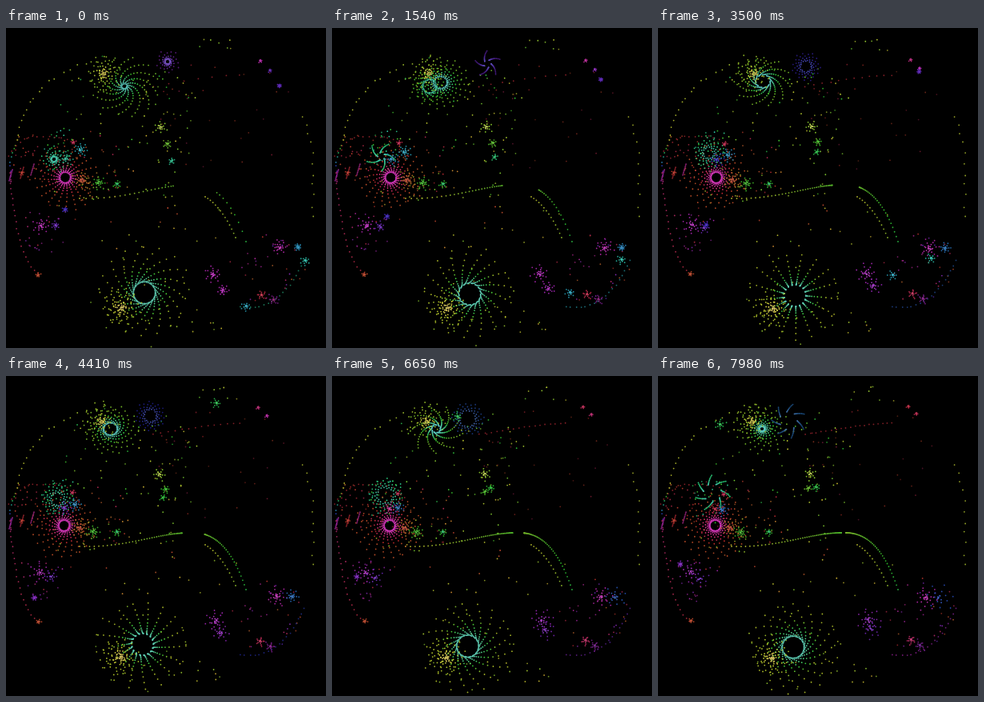
Animation, 400 px wide and 400 px high, one loop 8000 ms. Source, as an HTML page with a canvas:

```html
<!DOCTYPE html>
<html lang="en">
<head>
<meta charset="utf-8">
<title>Drifting orbits</title>
<style>
html, body { margin: 0; width: 100%; height: 100%; overflow: hidden; background: #000; }
canvas { display: block; width: 400px; height: 400px; }
</style>
</head>
<body>
<canvas id="stage" width="400" height="400"></canvas>
<script>
const ctx = document.getElementById('stage').getContext('2d');
const LOOP = 8000, STEP = 70, TAU = Math.PI * 2;
let progress = 0;

const mix = (a, b, u) => a + (b - a) * u;
const slide = (a, b, ease = 1) => mix(a, b, progress ** ease);
const settle = rate => Math.exp(-rate * progress);

function random(seed) {
  let s = Math.floor(seed * 7919) % 2147483647 + 1;
  const next = () => (s = (s * 16807) % 2147483647) / 2147483647;
  next();
  return next;
}

function dot(x, y, hue, light = 46, sat = 62) {
  ctx.fillStyle = `hsl(${hue} ${sat}% ${light}%)`;
  ctx.beginPath();
  ctx.arc(x, y, 0.9, 0, TAU);
  ctx.fill();
}

// Rotation orbit: arms appear whenever rho passes near a simple fraction
function bloom({ x, y, r, R, n, rho, pow = 2.5, hue, edge = hue, light = 58, dim = 42, sat = 50, flat = 1, phase = 0, noise = 0 }) {
  const rnd = random(n + R);
  for (let i = 0; i < n; i++) {
    const spread = (i / n) ** pow, d = r + (R - r) * spread;
    const a = phase + TAU * rho * i, c = Math.min(1, spread * 1.8);
    dot(x + d * Math.cos(a) + (rnd() - 0.5) * noise, y + d * Math.sin(a) * flat + (rnd() - 0.5) * noise,
      mix(hue, edge, c), mix(light, dim, c), mix(sat, 65, c));
  }
}

function star(x, y, R, n, hue, arms = 7, edge = hue, light = 52) {
  bloom({ x, y, r: 0.5, R, n, rho: 1 / arms + slide(-0.006, 0.006), pow: 1.4,
    hue, edge, light, dim: light * 0.75, noise: R * 0.17 });
}

// Star that crosses the stage during part of the loop
function traveller(from, to, x0, y0, x1, y1, hue, R = 7) {
  const u = (progress - from) / (to - from);
  if (u >= 0 && u <= 1) star(mix(x0, x1, u ** 1.2), mix(y0, y1, u), R, 17, hue, 6);
}

function curve([x0, y0, x1, y1, x2, y2, x3, y3], n, hue, edge, { light = 42, pow = 1, end = 1, noise = 0 } = {}) {
  const rnd = random(n + x0);
  const bezier = (a, b, c, d, u, v) => v * v * v * a + 3 * v * v * u * b + 3 * v * u * u * c + u * u * u * d;
  for (let i = 0; i < n; i++) {
    const u = end * (1 - (1 - i / (n - 1)) ** pow), v = 1 - u;
    dot(bezier(x0, x1, x2, x3, u, v) + (rnd() - 0.5) * noise,
      bezier(y0, y1, y2, y3, u, v) + (rnd() - 0.5) * noise, mix(hue, edge, u), light);
  }
}

function scatter(n, x, y, w, h, hue, spread, light = 43) {
  const rnd = random(x + y * n);
  for (let i = 0; i < n; i++) {
    const a = rnd() * TAU, d = Math.sqrt(rnd());
    const dx = (rnd() - 0.5) * 14, dy = (rnd() - 0.5) * 10;
    dot(x + w * d * Math.cos(a) + slide(-dx, dx), y + h * d * Math.sin(a) + slide(-dy, dy),
      hue + (rnd() - 0.5) * spread, light * mix(0.7, 1.15, rnd()));
  }
}

function drawBackground() {
  scatter(44, 150, 95, 82, 62, 95, 80);
  scatter(26, 205, 130, 40, 85, 80, 60);
  scatter(24, 65, 152, 26, 28, 140, 60);
  scatter(36, 48, 165, 45, 34, 358, 30, 38);
  scatter(28, 105, 175, 50, 48, 5, 50, 38);
  scatter(24, 110, 200, 72, 28, 60, 70);
  scatter(30, 270, 110, 85, 75, 355, 40, 24);
  scatter(22, 45, 248, 40, 32, 320, 90, 36);
  scatter(32, 325, 300, 48, 45, 320, 130, 36);
  scatter(18, 190, 250, 110, 45, 50, 80);
  scatter(26, 175, 345, 70, 50, 72, 30);
  scatter(7, 262, 22, 30, 14, 75, 50);
  scatter(6, 250, 380, 35, 16, 65, 40);
}

function drawTrails() {
  const pow = slide(1.2, 2.1);
  curve([92, 213, 150, 215, 190, 196, 229, 196], Math.round(slide(22, 60)), 60, 105, { pow, end: slide(0.83, 1) });
  curve([300, 267, 284, 218, 262, 196, 235, 196], Math.round(slide(9, 54)), 130, 85, { pow, end: slide(0.62, 1) });
  curve([249, 211, 263, 219, 277, 238, 287, 262], 14, 62, 78);

  curve([16, 140, 20, 92, 50, 52, 125, 38], 18, 60, 75, { noise: 5 });
  curve([40, 307, 18, 290, 9, 240, 5, 180], 22, 352, 330, { light: 38, pow: 1.5, noise: 1.5 });
  curve([16, 135, 8, 155, 3, 168, 6, 192], 11, 25, 320, { light: 38, noise: 2 });
  curve([5, 160, 14, 136, 45, 126, 86, 143], 15, 355, 355, { light: 32, noise: 4 });
  curve([372, 112, 382, 145, 388, 190, 384, 237], 11, 65, 70, { light: 40, noise: 5 });
  curve([184, 73, 225, 66, 258, 60, 292, 59], Math.round(slide(7, 19)), 355, 355, { light: 31, noise: 1 });
  curve([292, 348, 330, 355, 355, 330, 373, 290], 18, slide(160, 300), slide(160, 290), { light: 28, noise: 2 });
}

function drawBlooms() {
  bloom({ x: slide(173, 169), y: slide(331, 339), r: 13.5, R: 60, n: 250,
    rho: 1 / 17 + slide(0.0011, -0.0013), pow: 3, hue: 168, edge: 66 });

  bloom({ x: slide(74, 71.5), y: 187, r: 6.5, R: 43, n: 225,
    rho: 1 / 21 + slide(0.0026, -0.0011), pow: 2.2, hue: 308, edge: 375, light: 52, sat: 62 });

  const pull = settle(6);
  bloom({ x: 130 + 18 * pull, y: 66 + 7 * pull, r: 3 + 6 * Math.sin(Math.PI * progress ** 0.7),
    R: 36 + 8 * pull, n: 180, rho: slide(0.085, 0.119, 1.8), pow: 2.1 - 0.7 * pull,
    flat: 0.88, hue: 178, edge: 88 });
  if (progress > 0.08 && progress < 0.28)
    bloom({ x: 122, y: 73, r: 8, R: 22, n: 90, rho: 0.088, hue: 165, edge: 110, light: 50 });

  const spiral = {
    r: slide(3, 11), n: 72, rho: slide(0.2124, 0.1438, 1.15), pow: 1.4 + 1.4 * settle(10)
  };
  bloom({ ...spiral, x: slide(202, 163), y: slide(42, 56), R: slide(16, 22),
    hue: slide(258, 212), edge: slide(278, 210), light: slide(54, 44), dim: 28, sat: 42 });
  bloom({ ...spiral, x: slide(60, 68), y: slide(164, 146), R: slide(18, 23),
    hue: 168, edge: 150, light: 52, dim: 46, phase: 0.6 });
}

function drawUpperLeftStars() {
  star(slide(122, 118), 57, 25, 75, 52, 11, 76, 56);
  star(slide(93, 80), slide(152, 167), 9, 24, slide(185, 215), 7);
  star(slide(84, 82), slide(143, 148), 4, 11, 345, 5);
  star(slide(75, 72), slide(163, 166), 10, 24, slide(165, 350), 7);
  star(slide(95, 90), 190, 13, 36, 8, 9, 35);
  star(slide(116, 104), slide(193, 195), 10, 25, 110);
  star(139, 195, 6, 16, 155, 6, 115);
  star(slide(193, 190), slide(124, 122), 9, 20, 65, 6, 85, 60);
  star(slide(202, 198), slide(145, 139), 6, 16, slide(95, 130), 6);
  star(slide(207, 188), slide(166, 140), 5, 13, slide(160, 95), 5);
  traveller(0.55, 1, 263, 34, 76, 61, 135);
}

function drawLeftStars() {
  for (const [x, y, hue] of [[6, 184, 300], [20, 181, 355], [33, 177, 315]])
    for (let i = -4; i <= 4; i++) dot(x - i * 0.5, y + i * 1.7, hue, 35);
  star(20, 181, 4, 9, 5, 5);
  star(slide(44, 41), slide(247, 245), slide(12, 17), 27, slide(302, 290));
  star(slide(62, 52), slide(247, 254), slide(6, 14), 18, 268, 6);
  traveller(0, 0.5, 74, 227, 58, 249, 250, 4);
  traveller(0.5, 1, 36, 282, 28, 235, 275, 4);
  star(slide(40, 41), slide(309, 306), 4, 11, 12, 5);
}

function drawLowerStars() {
  star(slide(144, 142), slide(349, 352), 25, 92, 48, 12, 68, 60);
  star(slide(259, 263), slide(308, 305), slide(12, 17), 28, slide(300, 285));
  star(slide(271, 266), slide(328, 315), slide(8, 15), 23, slide(298, 270));
  star(slide(342, 335), slide(274, 277), slide(11, 17), 30, 305);
  star(slide(365, 351), slide(274, 277), slide(5, 20, 2), 22, slide(198, 225));
  traveller(0, 0.45, 374, 291, 340, 288, 172);
  traveller(0, 0.45, 300, 348, 293, 308, 190);
  star(slide(319, 316), slide(334, 330), 7, 17, slide(350, 335), 5);
  star(slide(334, 327), slide(340, 337), 7, 17, slide(320, 280), 5, 290, 38);
}

function drawUpperRightStars() {
  star(slide(318, 313), slide(41, 38), 3, 8, slide(305, 350), 5);
  star(slide(330, 323), slide(53, 47), 3, 8, slide(265, 345), 5);
  traveller(0, 0.45, 342, 72, 326, 54, 262, 3);
}

function render(now) {
  progress = Math.floor((now % LOOP) / STEP) * STEP / LOOP;
  ctx.fillStyle = '#000';
  ctx.fillRect(0, 0, 400, 400);
  drawBackground();
  drawTrails();
  drawBlooms();
  drawUpperLeftStars();
  drawLeftStars();
  drawLowerStars();
  drawUpperRightStars();
}

const start = performance.now();
function tick() {
  render(performance.now() - start);
  requestAnimationFrame(tick);
}
tick();
</script>
</body>
</html>
```
